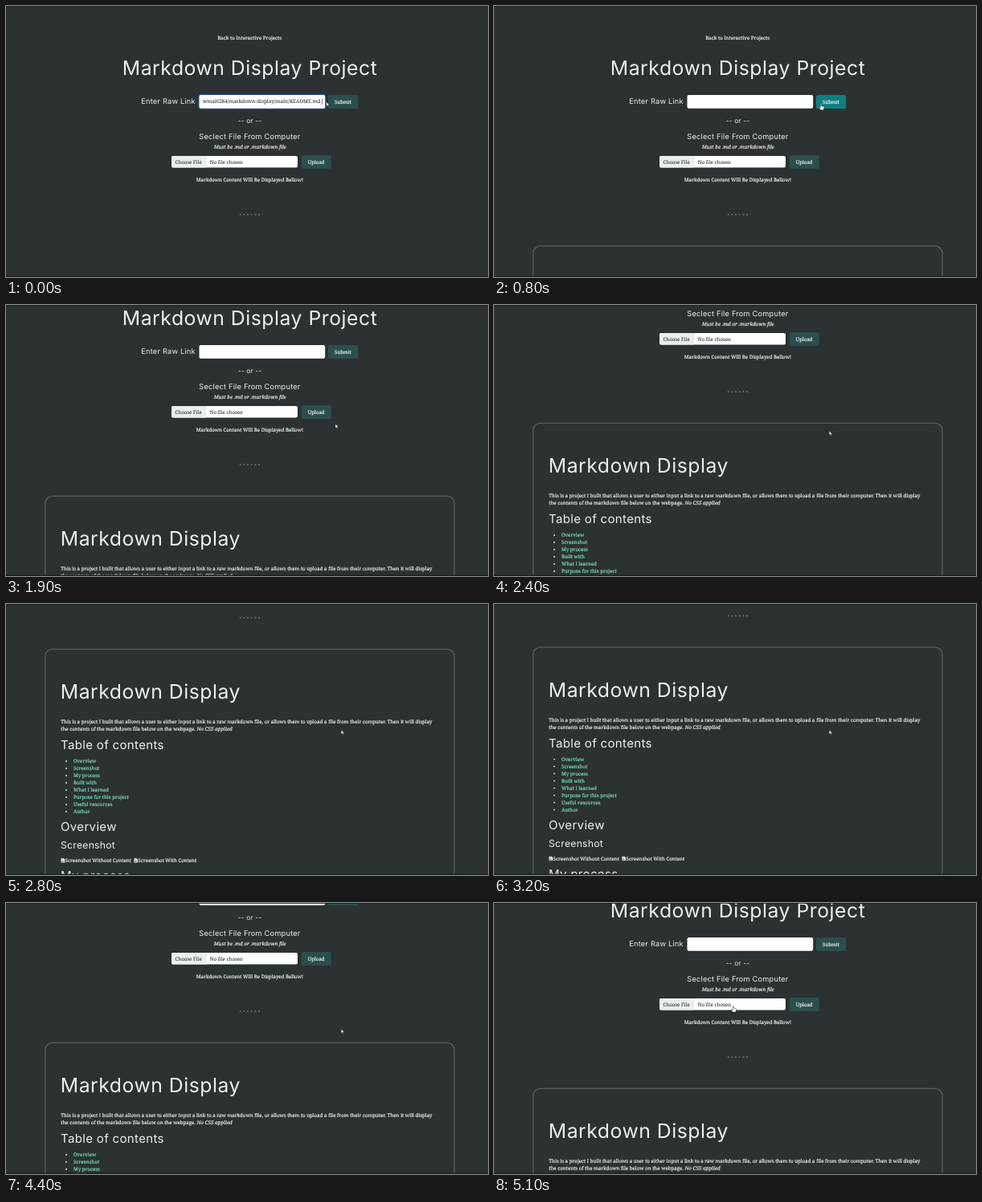
These frames come from a looping animation (600x338 px, 5.2 s). An HTML page:

```html
<!DOCTYPE html>
<html lang="en">
<head>
<meta charset="utf-8">
<title>Markdown Display</title>
<style>
  html, body { margin: 0; width: 100%; height: 100%; overflow: hidden; background: #2c3133; }
  svg { display: block; width: 100%; height: 100%; }
  text {
    font: 6.15px "Noto Serif", serif; color: #f4f5f5; fill: currentColor;
    stroke: currentColor; stroke-width: .17; text-rendering: geometricPrecision; white-space: pre;
  }
  .mid { text-anchor: middle; }
  .h1, .h2, .h3, .label { font-family: Inter, sans-serif; letter-spacing: .021em; color: #eef0f0; stroke: none; }
  .h1 { font-size: 24.75px; }
  .h2 { font-size: 15.05px; }
  .h3 { font-size: 12.2px; }
  .label { font-size: 9.25px; }
  .note { font-size: 6.35px; font-style: italic; }
  .dark { color: #34383b; stroke-width: .08; }
  .link { color: #7fe0c4; }
  .button { fill: #2b4f4e; }
  .button.hover { fill: #0f7f80; }
  .cursor { fill: #fff; stroke: #1b1e1f; stroke-width: .5; stroke-linejoin: round; }
</style>
</head>
<body>
<svg viewBox="0 0 600 338">
  <defs>
    <g id="broken">
      <path d="M.3 .3H3.4L4.7 1.6V5.4H.3Z" fill="#f1f4f6" stroke="#b4bbbe" stroke-width=".4"/>
      <path d="M.6 5.1V4L2 2.5 4.4 5.1Z" fill="#7fb384"/>
      <path d="M.6 .6H3V1.8L.6 3.2Z" fill="#b7cdec"/>
    </g>
  </defs>

  <g id="page">
    <text class="mid" x="303.2" y="42.2">Back to Interactive Projects</text>
    <text class="h1 mid" x="303.6" y="86">Markdown Display Project</text>

    <text class="label" x="168.3" y="122.4">Enter Raw Link</text>
    <rect id="ring" x="239.4" y="109.8" width="159" height="19" rx="3" fill="#24518f"/>
    <rect x="240.5" y="111" width="156.7" height="16.7" rx="2" fill="#fff"/>
    <g id="entry">
      <text class="dark" x="245" y="121.4" style="font-size:6.3px">wmaH284/markdown-display/main/README.md</text>
      <path d="M393.6 115.5v7.5" stroke="#222" stroke-width=".6"/>
    </g>
    <rect id="submit" class="button" x="401" y="111" width="37.2" height="17" rx="2"/>
    <text class="mid" x="419.4" y="121.5">Submit</text>

    <text class="label mid" x="303.5" y="145.6" style="font-size:8.4px">-- or --</text>
    <text class="label mid" x="303.4" y="166">Seclect File From Computer</text>
    <text class="note mid" x="303.7" y="177.6">Must be .md or .markdown file</text>

    <rect x="206" y="187" width="157" height="14.6" rx="2" fill="#fff"/>
    <path d="M208 187H249V201.6H208Q206 201.6 206 199.6V189Q206 187 208 187Z" fill="#eceff1"/>
    <path d="M249 187v14.6" stroke="#d3d8db" stroke-width=".5"/>
    <text class="dark" x="210.5" y="196.6">Choose File</text>
    <text class="dark" x="253.8" y="196.6">No file chosen</text>
    <rect class="button" x="367.8" y="186" width="36.9" height="17" rx="2"/>
    <text class="mid" x="386.2" y="196.8">Upload</text>

    <text class="mid" x="303.4" y="219">Markdown Content Will Be Displayed Bellow!</text>
    <path d="M291.8 260.2H316" stroke="#61686a" stroke-width="2.3" stroke-linecap="round" stroke-dasharray="0 4.65"/>

    <g id="content">
      <rect x="48.7" y="299.3" width="509.3" height="700" rx="9" fill="none" stroke="#596062" stroke-width="1.3"/>
      <text class="h1" x="67.8" y="361">Markdown Display</text>
      <text x="68.3" y="392.2">This is a project I built that allows a user to either input a link to a raw markdown file, or allows them to upload a file from their computer. Then it will display</text>
      <text x="68.3" y="401.2">the contents of the markdown file below on the webpage. <tspan class="note">No CSS applied</tspan></text>
      <text class="h2" x="68" y="424">Table of contents</text>
      <g id="list"></g>
      <text class="h2" x="68" y="526.4">Overview</text>
      <text class="h3" x="68" y="548.3">Screenshot</text>
      <use href="#broken" x="68.3" y="560"/>
      <text x="73.6" y="565.3">Screenshot Without Content</text>
      <use href="#broken" x="159.2" y="560"/>
      <text x="164.6" y="565.3">Screenshot With Content</text>
      <text class="h2" x="68" y="587.4">My process</text>
    </g>
  </g>

  <path d="M0 .4H600" stroke="#1a1d1e" stroke-width=".9"/>
  <path d="M0 337.4H600" stroke="#1a1d1e" stroke-width="1.2"/>

  <path id="arrow" class="cursor" d="M0 0V5.4L1.3 4.3 2.2 6.3 3.1 5.9 2.2 3.9H3.9Z"/>
  <path id="hand" class="cursor" d="M-.7 .5Q0-.5 .7 .5V2.6L3.3 3.2Q4 3.4 3.9 4.2L3.3 7.6H-.4L-2.5 4.9Q-2.3 3.9-1.5 4.3L-.7 5Z"/>
</svg>
<script>
const LOOP = 5200, STEP = 100;
const $ = id => document.getElementById(id);

$("list").innerHTML = ["Overview", "Screenshot", "My process", "Built with", "What I learned",
  "Purpose for this project", "Useful resources", "Author"].map((name, i) => {
    const y = 441 + 9 * i;
    return `<circle cx="75" cy="${y - 2}" r=".95" fill="#f4f5f5"/><text class="link" x="84" y="${y}">${name}</text>`;
  }).join("");

// Keys: [time, value, ...]
const scrollKeys = [[0, 0], [1600, 0], [1700, 1], [1800, 30], [1900, 61], [2400, 152], [2700, 234],
  [2800, 243], [3000, 245.4], [3700, 245.4], [4000, 192.3], [4400, 125], [4700, 76], [4900, 68], [LOOP, 68]];
const cursorKeys = [[0, 398.7, 119.5], [400, 407, 122], [1200, 407, 122.3], [1700, 409.6, 147.5],
  [1900, 410, 148.3], [2400, 417.2, 157], [4400, 417.2, 157], [4900, 360.5, 145.3], [5100, 297.7, 128.5], [LOOP, 297.7, 128.5]];

function track(keys, t) {
  const i = keys.findIndex(key => key[0] > t);
  const a = keys[i - 1], b = keys[i], k = (t - a[0]) / (b[0] - a[0]);
  return a.slice(1).map((v, n) => v + (b[n + 1] - v) * k);
}

const show = (id, on) => $(id).setAttribute("visibility", on ? "visible" : "hidden");

function draw(now) {
  const t = Math.floor(now % LOOP / STEP) * STEP;
  const [scroll] = track(scrollKeys, t);
  const [x, y] = track(cursorKeys, t);
  const onSubmit = t >= 200 && t < 1400;
  const pointing = onSubmit || t >= 5000;

  $("page").setAttribute("transform", `translate(0 ${-scroll})`);
  $("submit").classList.toggle("hover", onSubmit);
  show("ring", t < 600);
  show("entry", t < 700);
  show("content", t >= 700);
  show("arrow", !pointing);
  show("hand", pointing);
  for (const id of ["arrow", "hand"]) $(id).setAttribute("transform", `translate(${x} ${y})`);
}

const start = performance.now();
function loop() {
  draw(performance.now() - start);
  requestAnimationFrame(loop);
}
loop();
</script>
</body>
</html>
```
